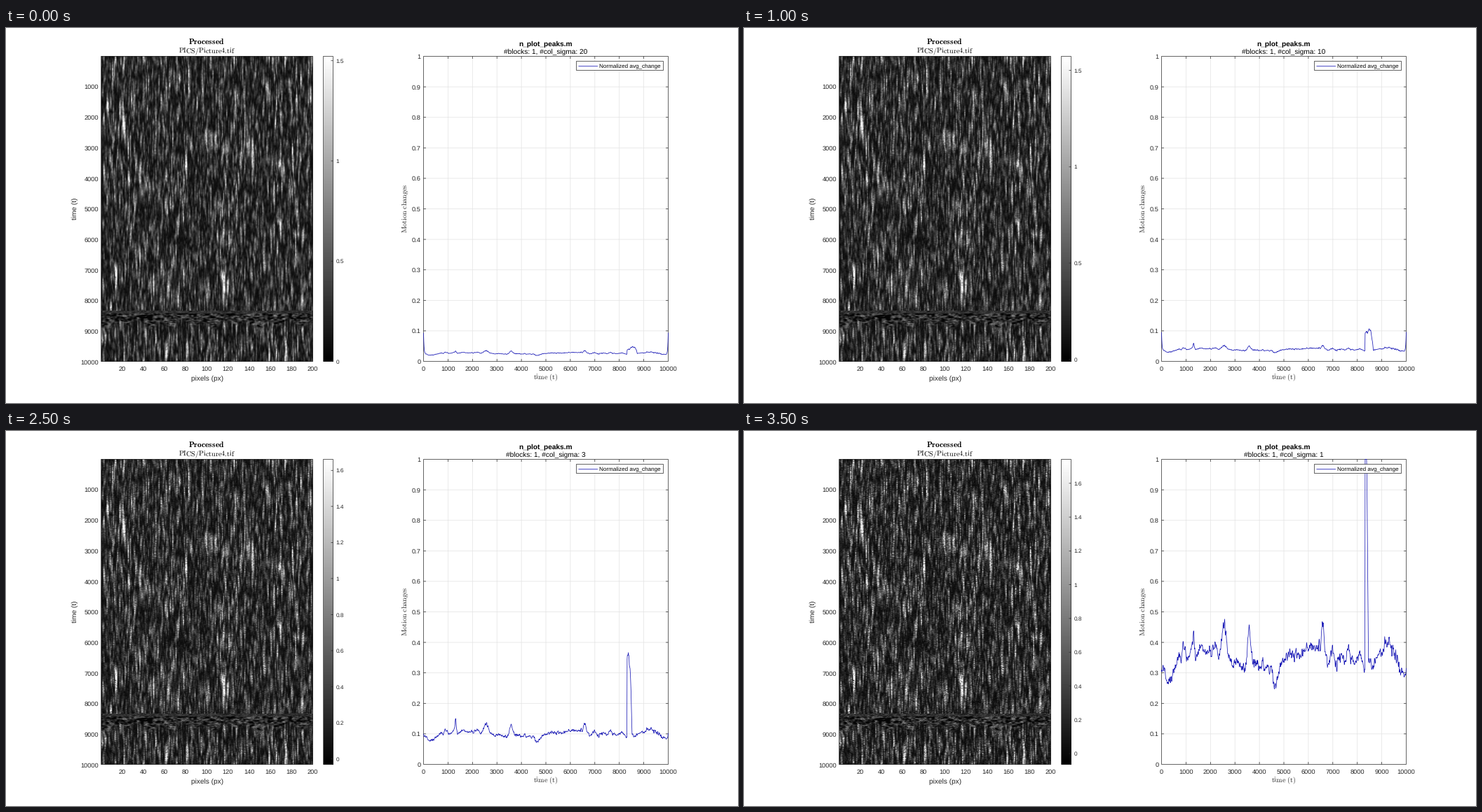
Write a matplotlib script that moves like this. It is 1044 by 536 pixels and loops after 4000 ms.

```python
import numpy as np
import matplotlib.pyplot as plt
from matplotlib.animation import FuncAnimation
from matplotlib.patches import Rectangle

W, H = 1044, 536
TOP, BOTTOM = 40.5, 476.5
DARK, GRID, BLUE = "#262626", "#e2e2e2", "#1414b4"
SIGMAS = [20, 15, 10, 5, 4, 3, 2, 1]

plt.rcParams.update({"font.family": "Liberation Sans", "mathtext.fontset": "cm",
                     "text.hinting": "none", "path.snap": False})
rng = np.random.default_rng(7)


def smooth(a, sy, sx):
    """Gaussian blur scaled back to unit deviation."""
    fy = np.fft.fftfreq(a.shape[0])[:, None]
    fx = np.fft.fftfreq(a.shape[1])[None, :]
    gain = np.exp(-2 * np.pi ** 2 * ((fy * sy) ** 2 + (fx * sx) ** 2))
    out = np.fft.ifft2(np.fft.fft2(a) * gain).real
    return out / out.std()


def bell(x, center, width):
    return np.exp(-((x - center) / width) ** 2)


# Streaked texture with a rippled horizontal band
ROWS, COLS = 437, 200
row, col = np.arange(ROWS)[:, None], np.arange(COLS)[None, :]
long_noise, short_noise, band_noise, grain_noise = rng.standard_normal((4, ROWS, COLS))
streak = 0.05 + 0.2 * np.abs(0.9 * smooth(long_noise, 11, 0.5)
                             + 0.4 * smooth(short_noise, 3.5, 0.4)) ** 1.3
streak += 0.07 * bell(col, 65, 9) * bell(row, 315, 18)
ripple = 0.17 + 0.12 * smooth(band_noise, 0.8, 1.0)
calm = 0.19 + 0.03 * smooth(band_noise, 0.5, 1.0)
band = np.where(row < 368, calm, ripple)
arch = 385 + 4 * np.sin(col * 0.31) + 3 * np.sin(col * 0.13 + 1)
in_band = (row >= 364) * np.clip((arch - row) / 6, 0, 1)
field = streak * (1 - in_band) + band * in_band
field[:, 0] *= 0.4

# Curve at sigma 1: slow swells, a few marked peaks and dips, jitter
t = np.linspace(0, 10000, 1001)
base = 0.352 + 0.02 * np.sin(2 * np.pi * (t - 5100) / 4000)
for center, height, width in [(300, -.07, 200), (1290, .03, 120), (2560, .09, 120),
                              (3200, -.03, 250), (3570, .09, 60), (4650, -.06, 120),
                              (6590, .10, 70), (7600, .06, 90), (9230, .06, 150),
                              (9900, -.06, 200)]:
    base += height * bell(t, center, width)
slow, fine = rng.standard_normal((2, 1, t.size))
base += 0.014 * smooth(slow, 0, 5)[0] + 0.009 * smooth(fine, 0, 0.8)[0]
shake = 1 + 0.03 * smooth(fine, 0, 0.8)[0]


def texture(sigma):
    grain = smooth(grain_noise, 0.045 * sigma, 0.2)
    return np.clip(field * (1 + (0.08 + 0.18 / np.sqrt(sigma)) * grain), 0.02, 1)


def curve(sigma):
    v = base * (0.04 + 0.72 / sigma + 0.24 / sigma ** 3)
    v = v + 0.07 * (1 - bell(sigma, 0, 7)) * (np.exp(-t / 20) + np.exp((t - 10000) / 20))
    v = v + 0.055 * np.exp(-sigma / 8) * bell(t, 1310, 35)
    start, end = 8320, 8400 + 400 * (1 - np.exp(-sigma / 12))
    foot = 0.9 - 0.015 * sigma
    rise = foot + (1 - foot) * np.clip((t - start) / (end - start), 0, 1)
    fall = 1 / (1 + np.exp(np.clip((t - end) / (25 + 1.5 * sigma), -50, 50)))
    burst = 1.2 / sigma * rise * fall * shake * (t >= start)
    return np.clip(np.maximum(v, burst), 0, 1)


def color_range(sigma):
    k = np.log(sigma)
    return -0.064 * (1 - (k / np.log(20)) ** 0.65), 1.742 - 0.0735 * k


fig = plt.figure(figsize=(W / 72, H / 72), dpi=72, facecolor="white")
ax = fig.add_axes([0, 0, 1, 1])
ax.axis("off")


def label(x, y, s, size=9.2, ha="center", va="baseline", color=DARK, **kw):
    return ax.text(x, y, s, fontsize=size, ha=ha, va=va, color=color, **kw)


def seg(xs, ys, color=DARK, lw=0.7, z=3):
    return ax.plot(xs, ys, color=color, lw=lw, zorder=z, solid_capstyle="butt")[0]


def box(x0, y0, x1, y1, fill="none", z=4):
    ax.add_patch(Rectangle((x0, y0), x1 - x0, y1 - y0, fc=fill, ec=DARK, lw=0.7, zorder=z))


# Left panel
image = ax.imshow(texture(20), cmap="gray", vmin=0, vmax=1, aspect="auto",
                  interpolation="bilinear", extent=(136, 438, 477, 40))
box(135.5, TOP, 437.5, BOTTOM)
label(285.5, 24, r"$\mathbf{Processed}$", 11.5, color="black")
label(287, 36.5, r"$\mathrm{PICS/Picture4.\!tif}$", 10.1, color="black")
label(287, 503.5, "pixels (px)", 10.1)
label(98.5, 258.5, "time (t)", 10.1, rotation=90, va="center")
for k in range(1, 11):
    label(132, 43.7 + 43.68 * k, str(1000 * k), ha="right")
    label(135.2 + 30.2 * k, 490.3, str(20 * k))

# Colorbar
ax.imshow(np.linspace(1, 0, 256)[:, None], cmap="gray", aspect="auto",
          extent=(452.5, 466.5, 477, 40))
box(452.5, TOP, 466.5, BOTTOM)
bar_ticks = [(seg([463.5, 466.5], [0, 0], z=5), label(470.3, 0, "", 8.3, ha="left"))
             for _ in range(9)]

# Right panel
X0, X1 = 595.5, 944.5
for k in range(11):
    x = X0 + (X1 - X0) * k / 10
    y = BOTTOM - (BOTTOM - TOP) * k / 10
    if 0 < k < 10:
        seg([x, x], [TOP, BOTTOM], GRID, 0.7, 1)
        seg([X0, X1], [y, y], GRID, 0.7, 1)
        for edge_y, d in ((TOP, 3.5), (BOTTOM, -3.5)):
            seg([x, x], [edge_y, edge_y + d])
        for edge_x, d in ((X0, 3.5), (X1, -3.5)):
            seg([edge_x, edge_x + d], [y, y])
    label(x, 490.3, str(1000 * k))
    label(591.5, y + 3.5, f"{k / 10:g}", ha="right")
box(X0, TOP, X1, BOTTOM)
label(770, 26, "n_plot_peaks.m", 10.1, weight="bold", color="black")
subtitle = label(770, 37, "", 10.1, color="black")
label(770, 502, r"$\mathrm{time\ (t)}$", 10.1)
label(570, 258, r"$\mathrm{Motion\ changes}$", 10.1, rotation=90, va="center")
line = seg(X0 + t * (X1 - X0) / 10000, t * 0, BLUE, 0.75, 5)

# Legend
box(813.5, 47.5, 937.5, 60.5, "white", 6)
seg([816.5, 844], [54.5, 54.5], BLUE, 0.75, 7)
label(846, 57.3, "Normalized avg_change", 8.16, ha="left", color="black", zorder=7)

ax.set_xlim(0, W)
ax.set_ylim(H, 0)


def update(i):
    sigma = SIGMAS[i]
    low, high = color_range(sigma)
    step = 0.5 if high < 1.6 else 0.2
    image.set_data(texture(sigma))
    subtitle.set_text(f"#blocks: 1, #col_sigma: {sigma}")
    line.set_ydata(BOTTOM - (BOTTOM - TOP) * curve(sigma))
    for k, (mark, text) in enumerate(bar_ticks):
        value = k * step
        y = BOTTOM - (BOTTOM - TOP) * (value - low) / (high - low)
        mark.set_visible(value <= high)
        text.set_visible(value <= high)
        mark.set_ydata([y, y])
        text.set_y(y + 3.1)
        text.set_text(f"{value:g}")
    return image, subtitle, line


anim = FuncAnimation(fig, update, frames=len(SIGMAS), interval=500, repeat=True,
                     repeat_delay=0, blit=False)
plt.show()
```
